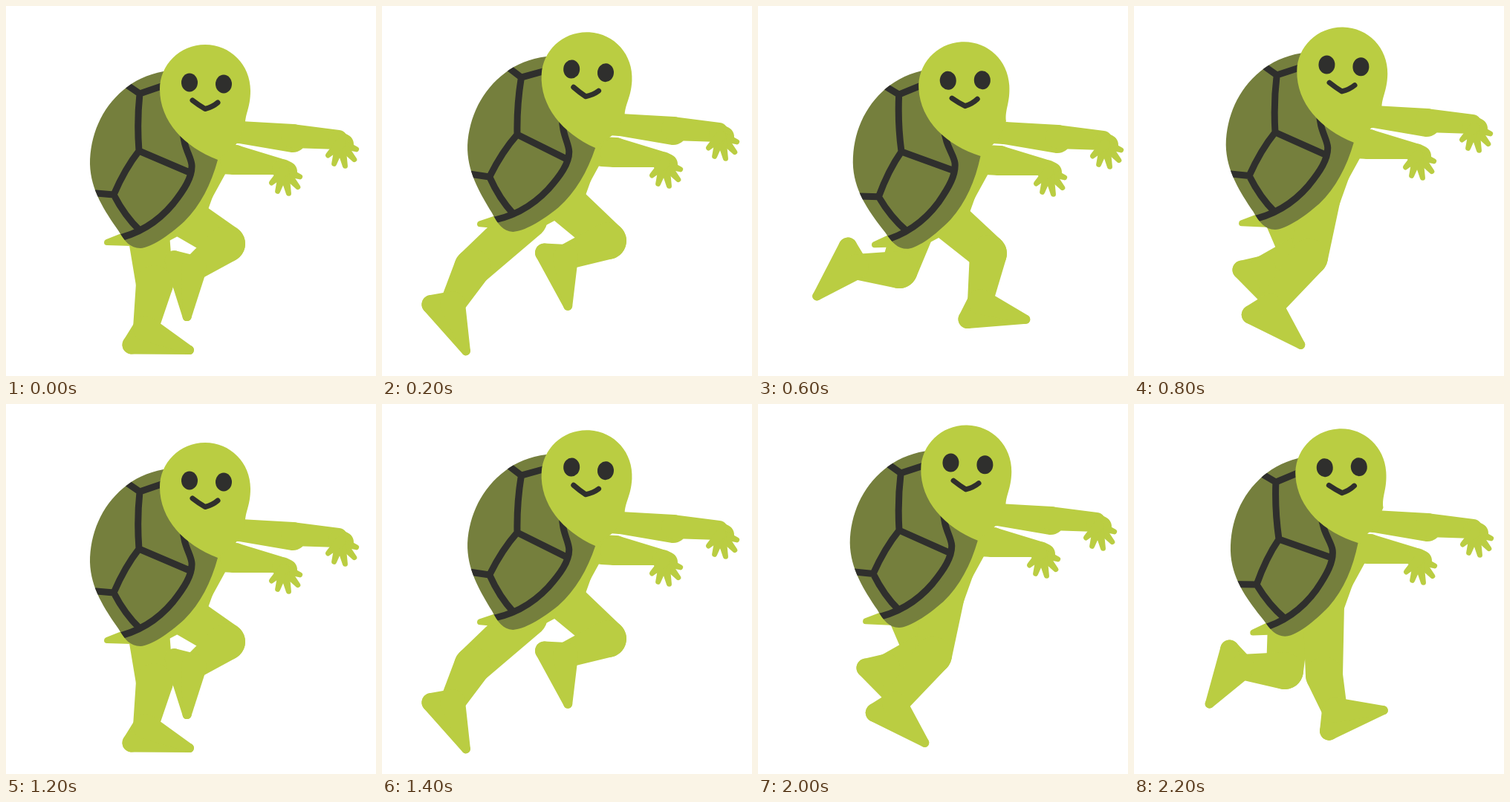
Recreate the animation shown at these times as an HTML page with a canvas. Size 498 by 498 pixels, loop 2.4 s.

```html
<!DOCTYPE html>
<html lang="en">
<head>
<meta charset="utf-8">
<title>Running turtle</title>
<style>
html, body { margin: 0; width: 100%; height: 100%; overflow: hidden; background: #fff; }
canvas { display: block; width: 498px; height: 498px; }
</style>
</head>
<body>
<canvas id="stage" width="498" height="498"></canvas>
<script>
const ctx = document.getElementById('stage').getContext('2d');
const SKIN = '#bacd42', SHELL = '#757f3d', DARK = '#2f2f2d';
const STEP = 200;
const HUB = { x: 179, y: 195 };   // pivot of shell and head
const RAD = Math.PI / 180;

// hub, tilt: shell and head; arms: shift of both arms;
// legs: knee, ankle and foot angle in degrees.
const cycle = [
  { hub: [179, 195], tilt: 0, arms: [0, 0],
    front: leg([297, 320], [253, 353], 72), rear: leg([200, 374], [188, 434], 0) },
  { hub: [182, 173], tilt: 3.3, arms: [6, -10],
    front: leg([304, 316], [247, 338], 61), rear: leg([122, 352], [95, 401], 48) },
  { hub: [179, 169], tilt: 5.6, arms: [10, -7],
    front: leg([285, 368], [296, 437], 0), rear: leg([128, 330], [69, 327], 118) },
  { hub: [193, 196], tilt: -3.2, arms: [17, 1],
    front: leg([310, 333], [299, 398], -5), rear: leg([190, 355], [132, 351], 117) },
  { hub: [190, 170], tilt: 0.9, arms: [8, -21],
    front: leg([236, 338], [184, 404], 26), rear: leg([222, 335], [174, 353], 45) },
  { hub: [195, 182], tilt: -3.8, arms: [9, -12],
    front: leg([256, 365], [270, 412], -26), rear: leg([203, 359], [145, 354], 105) }
];

const shellShape = new Path2D('M240 85 L212 88 C190 92 172 101 158 113 C128 138 113 175 113 213 ' +
  'C114 248 133 276 151 302 C160 317 167 326 181 326 C195 325 218 310 240 290 ' +
  'C262 268 276 240 285 207 Z');
const seams = new Path2D('M158 103 L180 118 L215 106 M180 118 Q176 156 179 195 L247 224 ' +
  'M179 195 Q160 219 145 254 L110 251 M145 254 Q160 283 180 302 ' +
  'M145 314 C180 307 205 290 225 266 C240 247 251 230 250 214 C249 202 238 190 238 165');
const headShape = new Path2D('M285 207 C240 190 207 155 207 112 C207 79 234 52 268 52 ' +
  'C302 52 329 79 329 114 C329 138 321 146 322 162 L310 186 Z');
const smile = new Path2D('M251 127 Q260 134 268 138.5 Q278 136 285 130');

function leg(knee, ankle, foot) {
  return { knee, ankle, foot };
}

// Hull of two circles, each given as x, y, radius.
function taper([ax, ay, ar], [bx, by, br]) {
  const angle = Math.atan2(by - ay, bx - ax);
  const open = Math.acos((ar - br) / Math.hypot(bx - ax, by - ay));
  ctx.fillStyle = SKIN;
  ctx.beginPath();
  ctx.arc(ax, ay, ar, angle + open, angle - open + 2 * Math.PI);
  ctx.arc(bx, by, br, angle - open, angle + open);
  ctx.fill();
}

function chain(...circles) {
  for (let i = 1; i < circles.length; i++) taper(circles[i - 1], circles[i]);
}

function moved([x, y], angle, draw) {
  ctx.save();
  ctx.translate(x, y);
  ctx.rotate(angle * RAD);
  draw();
  ctx.restore();
}

function stroke(path, width) {
  ctx.strokeStyle = DARK;
  ctx.lineWidth = width;
  ctx.lineJoin = ctx.lineCap = 'round';
  ctx.stroke(path);
}

function fill(path, color) {
  ctx.fillStyle = color;
  ctx.fill(path);
}

function drawLeg(hip, { knee, ankle, foot }) {
  chain([...hip, 28], [...knee, 25], [...ankle, 17]);
  moved(ankle, foot, () => {
    const top = [0, 0, 17], heel = [-19, 22, 12.5], toe = [59, 29, 6];
    chain(top, heel, toe, top);
  });
}

function drawHand(x, y) {
  taper([x - 2, y - 2, 14], [x + 4, y + 1, 14]);
  for (let i = 0; i < 5; i++) {
    const angle = (20 + 29 * i) * RAD;
    const reach = 23 + 8 * Math.sin(i * Math.PI / 4);
    taper([x, y, 7], [x + reach * Math.cos(angle), y + reach * Math.sin(angle), 3.5]);
  }
}

function drawArms() {
  chain([300, 169, 15], [315, 170, 15], [386, 178, 19]);
  taper([386, 175, 16], [447, 180, 13]);
  drawHand(450, 185);
  chain([290, 206, 20], [308, 207, 20], [368, 216, 11]);
  drawHand(374, 222);
}

function drawTorso([x, y], front, rear) {
  const rearHip = [x + 13, y + 113], frontHip = [x + 60, y + 88];
  chain([x + 101, y + 13, 22], [x + 75, y + 52, 26], [...frontHip, 28]);
  taper([...rearHip, 20], [...frontHip, 20]);
  drawLeg(rearHip, rear);
  drawLeg(frontHip, front);
}

function eye(x, y) {
  const oval = new Path2D();
  oval.ellipse(x, y, 11, 12.5, 0, 0, Math.PI * 2);
  fill(oval, DARK);
}

function drawShellAndHead() {
  ctx.translate(-HUB.x, -HUB.y);
  taper([136, 318, 4], [170, 312, 11]);
  fill(shellShape, SHELL);
  ctx.save();
  ctx.clip(shellShape);
  stroke(seams, 9);
  ctx.restore();
  fill(headShape, SKIN);
  eye(247, 103);
  eye(293, 105);
  stroke(smile, 7);
}

function drawPose({ hub, tilt, arms, front, rear }) {
  ctx.fillStyle = '#fff';
  ctx.fillRect(0, 0, 498, 498);
  drawTorso(hub, front, rear);
  moved(arms, 0, drawArms);
  moved(hub, tilt, drawShellAndHead);
}

const start = performance.now();
function tick(now) {
  const step = Math.floor(Math.max(0, now - start) / STEP);
  drawPose(cycle[step % cycle.length]);
  requestAnimationFrame(tick);
}
tick(start);
</script>
</body>
</html>
```
